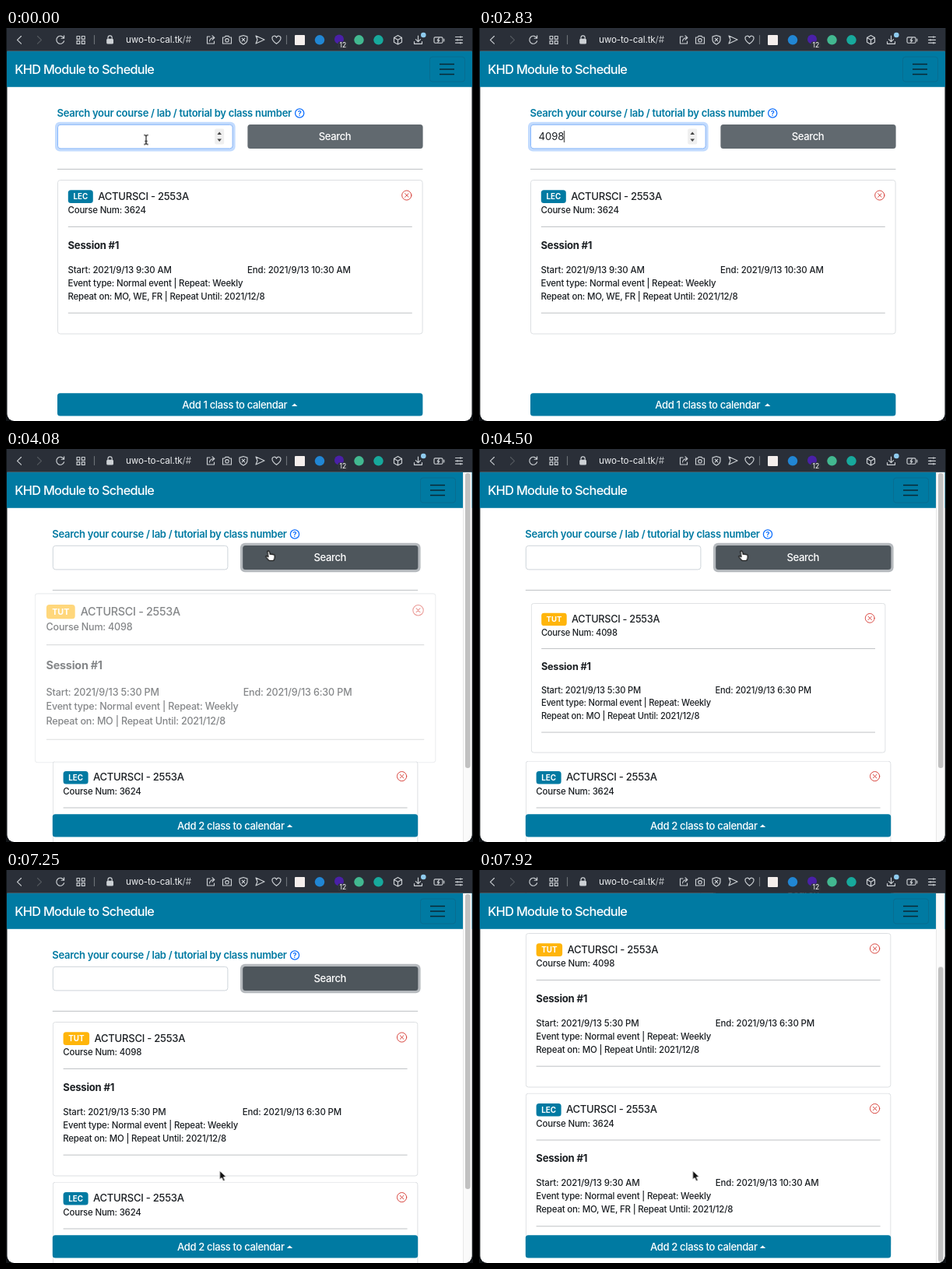
An HTML page that plays this animation: 600x505 px, repeating every 8 s.

```html
<!DOCTYPE html>
<html lang="en">
<head>
<meta charset="utf-8">
<title>Course calendar</title>
<style>
html, body { margin: 0; width: 100%; height: 100%; overflow: hidden; background: #111417; }
svg { display: block; width: 600px; height: 505px; }
text { font-family: Inter, "Noto Sans", sans-serif; font-size: 13.06px; fill: #1b1f23; white-space: pre; }
.brand { font-size: 16.3px; font-weight: 500; letter-spacing: -.7px; fill: #fff; }
.label { font-weight: 600; letter-spacing: -.3px; fill: #007aa2; }
.btn { font-weight: 500; letter-spacing: -.37px; fill: #fff; }
.name { font-weight: 500; letter-spacing: -.25px; }
.session { font-weight: 700; letter-spacing: -.2px; }
.small { font-size: 11.43px; font-weight: 450; letter-spacing: -.19px; }
.date { letter-spacing: -.13px; }
.badge { font-size: 9.8px; font-weight: 700; fill: #fff; text-anchor: middle; }
.url { font-size: 11.7px; letter-spacing: -.15px; fill: #eef0f2; }
.icon { fill: none; stroke: #cdd1d5; stroke-width: 1.15; stroke-linecap: round; stroke-linejoin: round; }
.rule { stroke: #bec1c4; }

/* one 8 s clock; 1% = 80 ms */
.step, .move { animation: 8s infinite; }
.step { animation-timing-function: step-end; }
.before { animation-name: before; }
.after { animation-name: after; }
.unclicked { animation-name: unclicked; }
.clicked { animation-name: clicked; }
.recenter { animation-name: recenter; }
.narrow { animation-name: narrow; }
.push { animation-name: push; }
.typed { animation-name: typed; }
.caret { animation-name: caret; }
.ibeam { animation-name: ibeam; }
.hand { animation-name: hand; }
.arrow { animation-name: arrow; }
.bounce { animation-name: bounce; transform-origin: 235px 99px; }
.scroll { animation-name: scroll; }
.thumb { animation-name: thumb; }
.pointer { animation-name: pointer; }

@keyframes before { 0% { visibility: visible } 49.38%, 100% { visibility: hidden } }
@keyframes after { 0% { visibility: hidden } 49.38%, 100% { visibility: visible } }
@keyframes unclicked { 0% { visibility: visible } 46.4%, 100% { visibility: hidden } }
@keyframes clicked { 0% { visibility: hidden } 46.4%, 100% { visibility: visible } }
@keyframes recenter { 0% { transform: translateX(6.2px) } 49.38%, 100% { transform: none } }
@keyframes narrow { 0% { transform: translateX(12px) } 49.38%, 100% { transform: none } }
@keyframes push { 0% { transform: translateY(195px) } 49.38%, 100% { transform: translateY(400.6px) } }
@keyframes typed {
  0% { clip-path: inset(0 100% 0 0) }
  17% { clip-path: inset(0 75% 0 0) }
  21.5% { clip-path: inset(0 50% 0 0) }
  26% { clip-path: inset(0 25% 0 0) }
  30.5% { clip-path: inset(0) }
  49.38%, 100% { clip-path: inset(0 100% 0 0) }
}
@keyframes caret {
  0% { opacity: 0; transform: none }
  3% { opacity: 1 }
  9% { opacity: 0 }
  15% { opacity: 1; transform: none }
  17% { transform: translateX(8px) }
  21.5% { transform: translateX(16px) }
  26% { transform: translateX(24px) }
  30.5% { transform: translateX(32px) }
  39% { opacity: 0 }
  45% { opacity: 1 }
  46.4%, 100% { opacity: 0; transform: translateX(32px) }
}
@keyframes ibeam { 0% { opacity: 1 } 17% { opacity: 0 } 38% { opacity: 1 } 41.9%, 100% { opacity: 0 } }
@keyframes hand { 0% { opacity: 0 } 41.9% { opacity: 1 } 75.6%, 100% { opacity: 0 } }
@keyframes arrow { 0% { opacity: 0 } 75.6%, 100% { opacity: 1 } }
@keyframes pointer {
  0%, 38.1% { transform: translate(180px, 143.5px); animation-timing-function: ease-in-out }
  44.4%, 62.5% { transform: translate(337px, 130.7px); animation-timing-function: ease-in-out }
  68.75%, 73.75% { transform: translate(335.5px, 145px); animation-timing-function: ease-in-out }
  83.75%, 100% { transform: translate(274.5px, 386.2px) }
}
@keyframes bounce {
  0%, 100%, 49.38%, 51.13%, 52.88%, 54.63%, 56.4% { animation-timing-function: cubic-bezier(.215, .61, .355, 1) }
  0%, 49.38% { opacity: 0; transform: scale(.3) }
  51.13% { transform: scale(1.1) }
  52.88% { transform: scale(.9) }
  54.63% { opacity: 1; transform: scale(1.03) }
  56.4% { transform: scale(.97) }
  58.2%, 100% { opacity: 1; transform: none }
}
@keyframes scroll {
  0%, 92.9% { transform: none; animation-timing-function: ease-in-out }
  98.5%, 100% { transform: translateY(-114px) }
}
@keyframes thumb {
  0%, 92.9% { transform: none; animation-timing-function: ease-in-out }
  98.5%, 100% { transform: translateY(93.5px) }
}
</style>
</head>
<body>
<svg viewBox="0 0 600 505">
  <defs>
    <clipPath id="window"><rect x="1.5" y="-20" width="597" height="525" rx="9"/></clipPath>
    <path id="beam" d="M-2.5-6q2.5 0 2.5 1.8v8.4q0 1.8-2.5 1.8M2.5-6Q0-6 0-4.2M2.5 6Q0 6 0 4.2M-1.5 2h3"/>
  </defs>
  <g clip-path="url(#window)">
    <rect width="600" height="505" fill="#fff"/>

    <g class="step recenter">
      <g class="move scroll">
        <text class="label" x="59.3" y="114">Search your course / lab / tutorial by class number</text>
        <circle cx="371" cy="109.5" r="5.6" fill="none" stroke="#0d6efd" stroke-width="1.3"/>
        <text x="371" y="112.8" text-anchor="middle" style="font-size:9px;font-weight:700;fill:#0d6efd">?</text>

        <rect class="step unclicked" x="56.8" y="120.8" width="231.6" height="37.6" rx="6" fill="#c2dbfe"/>
        <rect x="60.3" y="124.3" width="224.6" height="30.6" rx="3.5" fill="#fff" stroke="#ced4da"/>
        <g class="step unclicked">
          <rect x="60.3" y="124.3" width="224.6" height="30.6" rx="3.5" fill="#fff" stroke="#86b7fe"/>
          <rect x="262" y="129.5" width="12" height="20" rx="2" fill="#efefef"/>
          <path d="M265.2 137h5.6l-2.8-3.6zM265.2 142.5h5.6l-2.8 3.6z" fill="#444"/>
        </g>
        <text class="step typed" x="70.3" y="144.3">4098</text>
        <rect class="step caret" x="70.8" y="132" width="1" height="15" fill="#111"/>

        <rect class="step unclicked" x="304.2" y="124" width="225.2" height="31" rx="3.5" fill="#61696f"/>
        <g class="step clicked">
          <rect x="301" y="120.8" width="231.6" height="37.4" rx="6" fill="#b6babe"/>
          <rect x="304.2" y="124" width="225.2" height="31" rx="3.5" fill="#4e565c"/>
        </g>
        <text class="btn" x="416.3" y="144.3" text-anchor="middle">Search</text>
        <path class="rule" d="M59.8 181.4h469.4"/>

        <g transform="translate(59.8)"><g class="step push" id="lecture"></g></g>
        <g transform="translate(59.8 195)"><g class="move bounce" id="tutorial"></g></g>
      </g>

      <rect x="59.8" y="469.2" width="469.4" height="29.4" rx="3.5" fill="#007aa2"/>
      <text class="btn step before" x="220" y="488.6">Add 1 class to calendar</text>
      <text class="btn step after" x="220" y="488.6">Add 2 class to calendar</text>
      <path d="M360.8 486h7.4l-3.7-3.6z" fill="#fff"/>
    </g>

    <rect y="29.5" width="600" height="46.3" fill="#007aa2"/>
    <text class="brand" x="11.3" y="59">KHD Module to Schedule</text>
    <g class="step narrow">
      <rect x="532.5" y="37" width="45" height="32" rx="3.5" fill="none" stroke="#086d90"/>
      <path d="M545 46.5h19M545 53h19M545 59.5h19" stroke="#0a2935" stroke-width="1.5"/>
    </g>

    <g class="step after">
      <rect x="587" y="30" width="12" height="475" fill="#fafafa"/>
      <path d="M587.5 30v475" stroke="#e8e8e8"/>
      <rect class="move thumb" x="590" y="31" width="6.5" height="379" rx="3.2" fill="#c1c1c1"/>
    </g>

    <rect width="600" height="29.7" fill="#2a2f38"/>
    <g class="icon">
      <path d="M19.5 10.5l-5 4.8 5 4.8"/>
      <path d="M40.5 10.5l5 4.8-5 4.8" stroke="#555a60"/>
      <path d="M74.3 13a5 5 0 1 0 .3 3.8M74.6 9.8v3.4h-3.4"/>
      <path d="M91 10.5h3.8v3.8H91zM97.4 10.5h3.8v3.8h-3.8zM91 16.6h3.8v3.8H91zM97.4 16.6h3.8v3.8h-3.8z"/>
      <path d="M113.5 9.5v11M360.5 9.5v11" stroke="#6c7177"/>
      <path d="M131 14.5v-2a2.6 2.6 0 0 1 5.2 0v2"/>
      <rect x="129.8" y="14.3" width="7.6" height="5.6" rx="1" fill="#cdd1d5"/>
      <path d="M262 11h-3.5v9h9v-3M261.5 17c.5-3.5 2.5-4.5 6-4.5M265 9.8l2.8 2.7-2.8 2.7"/>
      <path d="M278.5 12h2.5l1-1.7h4l1 1.7h2.5v8h-11z"/><circle cx="284" cy="15.8" r="2.2"/>
      <path d="M305 9.5l5 1.6v4c0 3-2 4.6-5 6-3-1.4-5-3-5-6v-4zM303.2 13.2l3.6 3.6M306.8 13.2l-3.6 3.6"/>
      <path d="M321 10l11 5-11 5 2-5z"/>
      <path d="M347.5 20.3c-4-3-5.5-4.7-5.5-7a2.8 2.8 0 0 1 5.5-1 2.8 2.8 0 0 1 5.5 1c0 2.3-1.5 4-5.5 7z"/>
      <path d="M503.5 9.6l5 2.8v5.8l-5 2.8-5-2.8v-5.8zM498.5 12.4l5 2.8 5-2.8M503.5 15.2v5.8"/>
      <path d="M529.5 10v7.5M526.5 14.7l3 3 3-3M524.5 17.5v2.8h10v-2.8"/>
      <rect x="550" y="11.8" width="11" height="7.4" rx="1.5"/><path d="M562.8 14v3M556.4 12.8l-2.2 3h2.6l-2 2.6"/>
      <path d="M577.5 11.5h9M577.5 15.3h9M577.5 19.1h9M584 10.7v1.6M580 14.5v1.6M584 18.3v1.6"/>
    </g>
    <text class="url" x="154" y="19.2">uwo-to-cal.tk<tspan fill="#b4b8bc">/#</tspan></text>
    <rect x="371" y="9" width="13" height="13" rx="1" fill="#f4eeec"/>
    <circle cx="403" cy="15.3" r="6.2" fill="#2186d3"/>
    <circle cx="428" cy="14.5" r="6" fill="#4a20a8"/>
    <rect x="426.5" y="17.5" width="12.5" height="9.5" rx="2" fill="#30343c"/>
    <text x="432.8" y="25.3" text-anchor="middle" style="font-size:8.5px;fill:#fff">12</text>
    <circle cx="453.5" cy="15.3" r="6.2" fill="#42b890"/>
    <circle cx="478.5" cy="15.3" r="6.2" fill="#17a99c"/>
    <circle cx="536.3" cy="9" r="3.3" fill="#8fcbee"/>

    <g class="move pointer">
      <g class="step ibeam" fill="none" stroke-linecap="round">
        <use href="#beam" stroke="#fff" stroke-width="2.4"/>
        <use href="#beam" stroke="#111" stroke-width="1.1"/>
      </g>
      <g class="step hand">
        <path transform="scale(.88)" d="M-1.3 1.2Q0-.6 1.3 1l1.3 4.2q1.6-1 2.4.2 1.6-.8 2.3.4 1.6-.4 1.9 1.2v3.5l-1.5 3.8H1L-3 9.6q-1.5-2.2.8-1.8L0 9z" fill="#fff" stroke="#111" stroke-width="1.3" stroke-linejoin="round"/>
      </g>
      <g class="step arrow">
        <path transform="scale(1.08)" d="M0 0v10.8l2.5-2.2 1.8 4 2-.9-1.8-3.9H8z" fill="#111" stroke="#fff" stroke-width=".8"/>
      </g>
    </g>
  </g>
</svg>
<script>
const card = ({ kind, color, badge, num, start, end, days }) => `
  <rect x=".5" y=".5" width="468.6" height="197.5" rx="3.2" fill="#fff" stroke="#dcdfe2"/>
  <rect x="13.8" y="13.3" width="${badge}" height="16.7" rx="3.5" fill="${color}"/>
  <text class="badge" x="${13.8 + badge / 2}" y="25.2">${kind}</text>
  <text class="name" x="${badge + 20.2}" y="25.8">ACTURSCI - 2553A</text>
  <text class="small" x="13.5" y="43">Course Num: ${num}</text>
  <g fill="none" stroke="#d9463f" stroke-linecap="round">
    <circle cx="448.8" cy="20" r="6.1"/>
    <path d="M446.5 17.7l4.6 4.6M451.1 17.7l-4.6 4.6"/>
  </g>
  <path class="rule" d="M13.8 60.4h442M13.8 171.2h442"/>
  <text class="session" x="13.5" y="88.8">Session #1</text>
  <text class="small date" x="13.5" y="119.5">Start: 2021/9/13 ${start}</text>
  <text class="small date" x="244" y="119.5">End: 2021/9/13 ${end}</text>
  <text class="small" x="13.5" y="136.6">Event type: Normal event | Repeat: Weekly</text>
  <text class="small" x="13.5" y="153.7">Repeat on: ${days} | Repeat Until: 2021/12/8</text>`;

document.getElementById('lecture').innerHTML = card({
  kind: 'LEC', color: '#007aa2', badge: 32, num: 3624,
  start: '9:30 AM', end: '10:30 AM', days: 'MO, WE, FR'
});
document.getElementById('tutorial').innerHTML = card({
  kind: 'TUT', color: '#ffb50a', badge: 33.5, num: 4098,
  start: '5:30 PM', end: '6:30 PM', days: 'MO'
});
</script>
</body>
</html>
```
